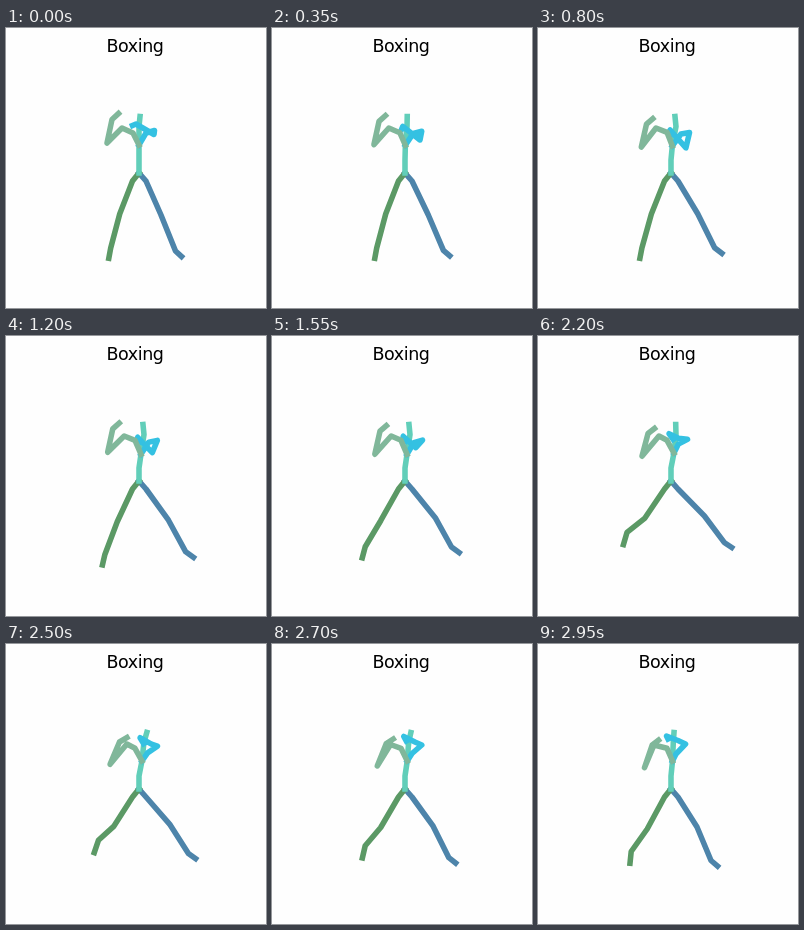
These frames come from a looping animation (260x280 px, 3 s). An HTML page with a canvas:

```html
<!DOCTYPE html>
<html lang="en">
<head>
<meta charset="utf-8">
<title>Boxing</title>
<style>
html, body { margin: 0; width: 100%; height: 100%; overflow: hidden; background: #fefefe; }
canvas { position: absolute; left: 0; top: 0; width: 260px; height: 280px; }
h1 {
  position: absolute; left: 0; top: 8px; width: 258px; margin: 0;
  font: 17.5px/20px "DejaVu Sans", sans-serif; letter-spacing: -0.45px;
  text-align: center; color: #000;
}
</style>
</head>
<body>
<canvas id="stage" width="260" height="280"></canvas>
<h1>Boxing</h1>
<script>
const LOOP = 3000, STEP = 50;
const ctx = document.getElementById("stage").getContext("2d");
ctx.lineWidth = 5.56;
ctx.lineCap = "square";
ctx.lineJoin = "round";

const ramp = (t, from, to) => Math.min(1, Math.max(0, (t - from) / (to - from)));

function ease(t, from, to) {
  const u = ramp(t, from, to);
  return u * u * (3 - 2 * u);
}

// A joint rests at a point; each phase pushes it by [dx, dy].
function joint(x, y, ...pushes) {
  for (const [dx, dy, amount] of pushes) {
    x += dx * amount;
    y += dy * amount;
  }
  return [x, y];
}

function limb(color, ...points) {
  ctx.strokeStyle = color;
  ctx.beginPath();
  points.forEach(p => ctx.lineTo(...p));
  ctx.stroke();
}

function drawBoxer(t) {
  // Right foot: reaches out, lifts, kicks, comes back.
  const reach = ease(t, 0, 1300);
  const lift = ramp(t, 0, 1900) ** 2;
  const kick = ease(t, 1900, 2240);
  const back = ease(t, 2240, 2950);
  // Left foot: strides, rises, recovers, settles.
  const stride = ease(t, 600, 2100);
  const rise = ease(t, 1000, 2300);
  const recover = ease(t, 2050, 2650);
  const settle = ease(t, 2450, 2950);
  // Upper body: leans in, jabs twice with the left, unfolds the right.
  const lean = ease(t, 0, 800);
  const jab = lean - 0.7 * ease(t, 800, 1200) + ease(t, 1200, 1900);
  const unfold = ease(t, 700, 2600);

  const root = [133, 145];
  const chest = joint(133, 117, [2, 1.3, reach], [1, -1.3, kick], [-1.5, 0, settle]);

  limb("#4D84AA", root, [140, 153],
    joint(155, 187, [6, 0, reach], [4, -7, lift], [1.5, 0, kick], [-7.5, 3, back]),
    joint(169.5, 223, [11, 0, reach], [-1.5, -18, lift], [7.5, 1.5, kick], [-13.5, 10, back]),
    joint(175.5, 228.5, [13, 0, reach], [-2, -18, lift], [7.5, 1, kick], [-14.5, 10.5, back]));

  limb("#5B9965", root, [126.5, 153],
    joint(113.7, 186, [-7, 0, stride], [0, -4, rise], [1.5, 0, recover], [1, 3, settle]),
    joint(104.7, 220, [-16.5, 0, stride], [0, -24, rise], [5, 0, recover], [0, 11.5, settle]),
    joint(102.8, 230.3, [-18, 0, stride], [0, -22, rise], [4, 0, recover], [3.2, 11, settle]));

  limb("#61CEB9", root, [133, 132], chest,
    joint(133, 98.5, [5, 0, lean], [-2.7, 0, settle]),
    joint(134, 88.5, [3, 0, lean], [4.7, 0, recover], [-5.7, 0, settle]));

  limb("#34C1E2", chest,
    joint(140, 105, [3, 1, lean], [-3, 2, rise], [2, 1, recover], [-4, 1, settle]),
    joint(148.5, 102.5, [3, 2, lean], [-2.5, -1, rise], [3, -1.5, recover], [-4.5, -2, settle]),
    joint(148, 106.5, [0, 13.5, lean], [-10, -20, unfold], [9, 0, recover], [-7, -3.5, settle]),
    joint(130, 96, [2, 6, lean], [-2, -4, unfold], [5, -5, recover], [-6.5, -1, settle]),
    joint(126.5, 97.5, [8, 8.5, lean], [0, -2, unfold], [4, -5, recover], [-8.5, -4, settle]));

  limb("#80B79A", chest,
    joint(127, 105, [2, -0.7, lean]),
    joint(116, 100, [2, 0, lean], [3, 0, rise], [-5, 1, settle]),
    joint(101, 115, [2.3, 4, jab], [2.5, 3.5, settle]),
    joint(106, 91.5, [2.5, 4.6, jab], [5, 0.5, recover], [0, 3, settle]),
    joint(112.5, 85.5, [2.3, 5.2, jab], [6.5, 1.5, recover], [-1.5, 2.5, settle]));
}

function frame() {
  ctx.clearRect(0, 0, 260, 280);
  drawBoxer(Math.floor(performance.now() % LOOP / STEP) * STEP);
  requestAnimationFrame(frame);
}
frame();
</script>
</body>
</html>
```
